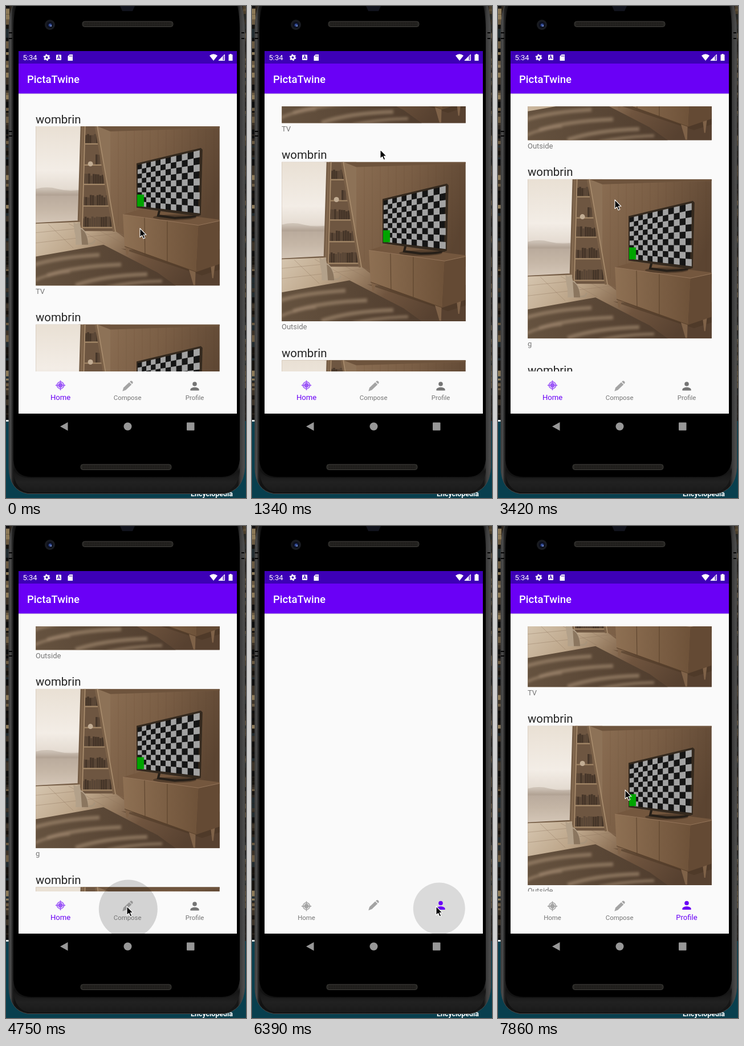
An HTML page for the animation above (8000 ms loop, 421 by 863 pixels).

```html
<!DOCTYPE html>
<html lang="en">
<head>
<meta charset="utf-8">
<title>Photo feed</title>
<style>
html, body { margin: 0; width: 100%; height: 100%; overflow: hidden; background: #111; }
svg { display: block; }
text { font-family: Roboto, "Open Sans", sans-serif; }
.title { font-size: 20.4px; fill: #222; }
.caption { font-size: 13px; fill: #777; }
.tab { color: #757575; }
.tab text { font-size: 11.4px; fill: currentColor; text-anchor: middle; }
.tab.on { color: #6a00f6; }
.tab.on text { font-size: 13.1px; }
.soft { opacity: .64; }
</style>
</head>
<body>
<svg id="stage" width="421" height="863" viewBox="0 0 421 863">
  <defs>
    <linearGradient id="side" x1="0" x2="1" y1="0" y2="0">
      <stop offset="0" stop-color="#3a3a3a"/><stop offset=".008" stop-color="#4e4e4e"/>
      <stop offset=".014" stop-color="#262626"/><stop offset=".024" stop-color="#121212"/>
      <stop offset=".97" stop-color="#161616"/><stop offset=".982" stop-color="#3c3c3c"/>
      <stop offset="1" stop-color="#505050"/>
    </linearGradient>
    <linearGradient id="chin" x1="0" x2="0" y1="0" y2="1">
      <stop offset="0" stop-color="#121212"/><stop offset=".6" stop-color="#212121"/><stop offset="1" stop-color="#1a1a1a"/>
    </linearGradient>
    <linearGradient id="sky" x1="0" x2="0" y1="0" y2="1">
      <stop offset="0" stop-color="#e9e0d4"/><stop offset=".45" stop-color="#f3ede6"/>
      <stop offset=".64" stop-color="#e4dbd1"/><stop offset=".7" stop-color="#b9aa9c"/>
      <stop offset=".84" stop-color="#c5b6a6"/><stop offset="1" stop-color="#d5c7b8"/>
    </linearGradient>
    <linearGradient id="wall" x1="0" x2="1" y1="0" y2=".35">
      <stop offset="0" stop-color="#9a8066"/><stop offset=".35" stop-color="#8a6d52"/>
      <stop offset=".65" stop-color="#7a5e45"/><stop offset="1" stop-color="#5b4431"/>
    </linearGradient>
    <linearGradient id="floor" x1="0" x2="1" y1="0" y2=".3">
      <stop offset="0" stop-color="#d6c6b0"/><stop offset=".3" stop-color="#bda68a"/>
      <stop offset=".5" stop-color="#957a5f"/><stop offset=".68" stop-color="#6f543e"/>
      <stop offset="1" stop-color="#574130"/>
    </linearGradient>
    <linearGradient id="wood" x1="0" x2="1" y1="0" y2="0">
      <stop offset="0" stop-color="#8e7053"/><stop offset="1" stop-color="#6e5239"/>
    </linearGradient>
    <linearGradient id="rug" x1="0" x2="1" y1="0" y2="0">
      <stop offset="0" stop-color="#65523f"/><stop offset="1" stop-color="#4f3c2d"/>
    </linearGradient>
    <filter id="blur" x="-10%" y="-30%" width="120%" height="160%"><feGaussianBlur stdDeviation="2.2"/></filter>
    <clipPath id="feedClip"><rect x="22" y="176" width="383" height="465"/></clipPath>
    <clipPath id="screenClip"><rect x="22" y="79" width="383" height="636"/></clipPath>
    <clipPath id="rugClip"><path d="M0 229L119 208L214 257L246 280H0Z"/></clipPath>

    <symbol id="photo" width="323" height="280" viewBox="0 0 323 280">
      <rect width="323" height="280" fill="url(#wall)"/>
      <path d="M75 0H131V182L76 170Z" fill="#8d7257"/>
      <path d="M108 0H323V3L131 9Z" fill="#6e543d"/>
      <path id="planks" stroke="#5f4731" stroke-opacity=".18" fill="none"/>
      <path d="M0 0H80L75 168L0 172Z" fill="url(#sky)"/>
      <path d="M0 110Q20 105 38 110T77 112V122H0Z" fill="#a99a8b" opacity=".4"/>
      <path d="M80 0L75 167L0 171" fill="none" stroke="#745c45" stroke-width="3"/>
      <path d="M0 171L77 168L140 184L156 196L323 216V280H0Z" fill="url(#floor)"/>
      <path d="M0 187L90 178M0 205L145 188M22 172L66 214M58 171L122 207M100 177L190 226M130 181L205 213" stroke="#8d755d" stroke-opacity=".4" fill="none"/>
      <path d="M0 229L119 208L214 257L246 280H0Z" fill="url(#rug)"/>
      <g clip-path="url(#rugClip)"><g filter="url(#blur)" fill="none" stroke="#9c846b" stroke-opacity=".7">
        <path d="M-5 244Q40 230 112 226M20 262Q70 246 150 243M70 279Q120 262 196 260" stroke-width="7"/>
        <path d="M-5 272Q25 258 60 255M125 283Q170 273 222 272" stroke-width="5"/>
      </g></g>
      <path d="M84 0H107L138 184H79Z" fill="#6e5641"/>
      <g id="books"></g>
      <path d="M85 0L80 186M106 0L138 185" stroke="#7b6148" stroke-width="5" fill="none"/>
      <path d="M86.5 0L81.5 186M108 0L140 185" stroke="#a78b6c" stroke-width="1.8" fill="none"/>
      <circle cx="96" cy="66" r="4.5" fill="#c2ad94"/>
      <path d="M92 206Q101 208 104 200" fill="none" stroke="#a8947b" stroke-width="3"/>
      <path d="M67 177L66 168L71 171L77 168L79 178Q92 184 92 208H70Q71 195 68 185Z" fill="#b3a18a"/>
      <path d="M79 180Q91 186 92 208H81Z" fill="#8b765f"/>
      <path d="M150 215L292 262L323 252V232Z" fill="#493423" opacity=".5"/>
      <path d="M157 208H167L162 226H159ZM268 248H281L280 279H277ZM307 242H315L312 267H310Z" fill="#7f6248"/>
      <path d="M153 155L183 146L323 164V184Z" fill="#74573e"/>
      <path d="M153 155L286 174L282 256L156 211Z" fill="url(#wood)"/>
      <path d="M286 174L323 166V242L282 256Z" fill="#644a34"/>
      <path d="M153 155L286 174L323 166" stroke="#94755a" fill="none"/>
      <path d="M191 161L192 224M231 167L231 238M156 211L282 256" stroke="#59412c" fill="none"/>
      <ellipse cx="244" cy="160" rx="38" ry="5" fill="#3f2e20" opacity=".6"/>
      <path d="M210 144L218 145L215 157L244 161Q279 160 281 157L275 150" fill="none" stroke="#261f18" stroke-width="4"/>
      <path d="M177 65L290 38L293 41L290 156L285 158L177 143Z" fill="#34291e"/>
      <path d="M179 68L288 42L285 153L179 140Z" fill="#151515"/>
      <path id="checks" fill="#a2a2a2"/>
      <rect x="178" y="120" width="12" height="21" fill="#00a400"/>
    </symbol>
  </defs>

  <rect width="421" height="863" fill="#2b241c"/>
  <g id="rocks"></g>
  <rect y="728" width="421" height="135" fill="#083f4e"/>
  <rect y="726" width="6" height="3" fill="#dfe6e6"/>
  <text x="324" y="860" style="font:700 12.4px Roboto,sans-serif" fill="#fff">Encyclopedia</text>

  <path d="M16 -10Q5 8 5 45V810Q6 850 38 855.5H383Q416 850 419 810V45Q418 8 410 -10Z" fill="url(#side)" stroke="#474747"/>
  <path d="M13 810Q17 828 45 828H376Q406 827 410 810V818Q406 848 381 853H40Q16 848 13 818Z" fill="url(#chin)"/>
  <path d="M20 -5Q13 10 13 45V796Q15 826 45 826H378Q407 826 410 796V45Q410 10 404 -5Z" fill="#000"/>
  <path d="M5 47H11M5 57H11M5 220H11M5 228H11M413 47H418M413 57H418" stroke="#050505" stroke-width="2"/>
  <path d="M200 0H226L222 9H204Z" fill="#11131c"/>
  <circle cx="77" cy="33" r="9" fill="#191b20"/>
  <circle cx="77" cy="33" r="5.5" fill="#0c1020"/>
  <circle cx="77.5" cy="33.5" r="2.8" fill="#324a91"/>
  <circle cx="79" cy="35" r="1" fill="#a6bcf0"/>
  <g id="speakers"></g>

  <rect x="22" y="79" width="383" height="636" fill="#fafafa"/>
  <rect x="22" y="153" width="383" height="1.5" fill="#d5d2da"/>
  <rect x="22" y="101" width="383" height="52.5" fill="#6a00f6"/>
  <rect x="22" y="79" width="383" height="22" fill="#3d00b6"/>
  <text x="37" y="134.5" font-size="18.5" font-weight="500" fill="#fff">PictaTwine</text>
  <text x="29.5" y="95" font-size="13" fill="#fff">5:34</text>
  <g fill="#fff">
    <circle cx="71.5" cy="90.3" r="3.2" fill="none" stroke="#fff" stroke-width="2.5"/>
    <circle cx="71.5" cy="90.3" r="5" fill="none" stroke="#fff" stroke-width="1.8" stroke-dasharray="2.6 2.636"/>
    <rect x="88" y="85.5" width="9" height="9.5" rx="1"/>
    <path d="M90 93L92.5 87L95 93M91 91.3H94" fill="none" stroke="#3d00b6" stroke-width="1.1"/>
    <path d="M111.5 85H117V96H108.5V88Z"/>
    <path d="M111.5 86.5V89M113.5 86.5V89M115.4 86.5V89" stroke="#3d00b6" stroke-width=".8"/>
    <path d="M357 87Q364 81.5 371 87L364 96Z"/>
    <path d="M373 95.5L383.5 85V95.5Z" opacity=".45"/>
    <path d="M373 95.5L380 88.5V95.5Z"/>
    <path d="M383.5 85V95.5H373Z" fill="none" stroke="#fff"/>
    <path d="M392.5 84H395.5V85.3H397.5V96H390.5V85.3H392.5Z"/>
  </g>

  <g clip-path="url(#feedClip)"><g id="feed"></g></g>
  <g clip-path="url(#screenClip)"><circle id="ripple" fill="#000"/></g>

  <g class="tab">
    <g class="icon soft" stroke="currentColor" fill="none">
      <circle r="6" stroke-width="1.6"/><circle r="4" fill="currentColor" stroke="none"/>
      <path d="M0 -8.6V8.6M-8.6 0H8.6" stroke-width="1.7"/>
    </g>
    <text x="95.5">Home</text>
  </g>
  <g class="tab">
    <g class="icon soft" fill="currentColor">
      <path d="M-9 9L-7.2 2.7L2.8 -6.8L7 -2.8L-3 6.8Z"/><path d="M3.8 -7.7L5.2 -9Q7 -9.8 8.7 -8Q10 -6.2 9 -5L7.9 -3.8Z"/>
    </g>
    <text x="213.2">Compose</text>
  </g>
  <g class="tab">
    <g class="icon" fill="currentColor">
      <circle cy="-3.8" r="3.8"/><path d="M-7.6 7.6V5.7C-7.6 3.2 -2.5 1.9 0 1.9S7.6 3.2 7.6 5.7V7.6Z"/>
    </g>
    <text x="331">Profile</text>
  </g>

  <g fill="#979797">
    <path d="M95 737.5L108.5 730V745Z"/><circle cx="213.5" cy="737.5" r="7"/><rect x="317" y="730.5" width="13.5" height="14" rx="1"/>
  </g>
  <path id="cursor" d="M0 0V15.5L3.6 12.3L6 18L8.7 16.9L6.3 11.3H11Z" fill="#000" stroke="#fff" stroke-width="1.1" stroke-linejoin="round"/>
</svg>

<script>
const $ = id => document.getElementById(id);
const LOOP = 8000, STEPS = 54, PITCH = 347.6;

let seed = 7;
const rand = () => (seed = (seed * 16807) % 2147483647) / 2147483647;

function buildRocks() {
  const tones = ['#14110d', '#6b5a41', '#3b3227', '#8d7a58', '#202a2e', '#0c0c0c'];
  let out = '';
  for (let y = 0; y < 728; y += 3 + rand() * 9) {
    const tone = () => tones[Math.floor(rand() * tones.length)];
    out += `<rect y="${y}" width="6" height="${3 + rand() * 9}" fill="${tone()}"/>`
         + `<rect x="416" y="${y}" width="5" height="9" fill="${tone()}" opacity=".5"/>`;
  }
  $('rocks').innerHTML = out;
}

function buildPhoto() {
  let planks = '';
  for (let x = 145; x < 323; x += 14) planks += `M${x} ${9 - (x - 131) * .03}V${175 + (x - 145) * .15}`;
  $('planks').setAttribute('d', planks);

  let books = '';
  [31, 68, 102, 140, 178].forEach((y, row) => {
    const left = 87 - y * .03, right = 104 + y * .17;
    for (let x = left; x < right - 3; x += 4) {
      if (row === 1 && x < 104) continue;
      const h = 15 + rand() * 5;
      books += `<rect x="${x}" y="${y - h}" width="3.6" height="${h}" fill="${rand() < .6 ? '#463629' : '#594636'}"/>`;
    }
    books += `<path d="M${left - 2} ${y}H${right + 2}" stroke="#a48868" stroke-width="2.2"/>`;
  });
  $('books').innerHTML = books;

  const cols = 12, rows = 9;
  const at = (i, j) => {
    const t = i / cols, u = t * (.8 + .2 * t), top = 68 - 26 * u, bottom = 140 + 13 * u;
    return `${179 + 109 * u} ${top + (bottom - top) * j / rows}`;
  };
  let checks = '';
  for (let i = 0; i < cols; i++)
    for (let j = (i + 1) % 2; j < rows; j += 2)
      checks += `M${at(i, j)}L${at(i + 1, j)}L${at(i + 1, j + 1)}L${at(i, j + 1)}Z`;
  $('checks').setAttribute('d', checks);
}

function buildFeed() {
  $('feed').innerHTML = ['TV', 'Outside', 'g', 'TV'].map((caption, i) =>
    `<g transform="translate(52 ${211 + i * PITCH})">
      <text class="title" y="-5.5">wombrin</text>
      <use href="#photo" width="323" height="279.5"/>
      <text class="caption" y="293.7">${caption}</text>
    </g>`).join('');
}

function buildSpeakers() {
  $('speakers').innerHTML = [[134, 27], [131, 804]].map(([x, y]) =>
    `<rect x="${x}" y="${y}" width="159" height="9.5" rx="4" fill="#262522" stroke="#3a3936"/>
     <path d="M${x + 4} ${y + 3}h151m-151 3.5h151" stroke="#100f0e" stroke-width="1.5" stroke-dasharray="1.5 1.5"/>`).join('');
}

// Keys: step, then values
const cursorKeys = [
  [0, 235, 390], [4, 231, 251], [6, 230, 397], [9, 225, 252], [12, 220, 390], [16, 212, 220],
  [19, 212, 487], [23, 205, 340], [24, 203, 333], [26, 200, 430], [29, 210, 687], [30, 212, 667],
  [35, 212, 667], [40, 323, 667], [44, 323, 667], [47, 228, 605], [48, 228, 605], [53, 223, 463]
];
const scrollKeys = [
  [0, 0], [4, 140], [6, 146], [9, 285], [12, 290], [16, 455.5], [19, 460],
  [23, 602.5], [24, 620.5], [33, 620.5], [34, 0], [48, 0], [53, 208]
];
// step: x, y, radius, alpha
const ripples = {
  32: [214.3, 672, 51.5, .155], 33: [214, 674, 56, .07],
  43: [328.3, 671, 45.5, .125], 44: [330, 673, 56, .07]
};

function sample(keys, k) {
  const n = keys.findIndex(key => key[0] >= k);
  if (n <= 0) return keys[n < 0 ? keys.length - 1 : 0].slice(1);
  const a = keys[n - 1], b = keys[n], p = (k - a[0]) / (b[0] - a[0]);
  return a.slice(1).map((v, i) => v + (b[i + 1] - v) * p);
}

const tabs = [...document.querySelectorAll('.tab')];
const tabX = [95.5, 213.3, 331];

function draw(k) {
  const page = k < 33 ? 0 : k < 43 ? 1 : 2;
  const [x, y] = sample(cursorKeys, k);
  $('cursor').setAttribute('transform', `translate(${x} ${y})`);
  $('feed').setAttribute('transform', `translate(0 ${-sample(scrollKeys, k)[0]})`);
  $('feed').setAttribute('opacity', k < 33 || k >= 45 ? 1 : k === 33 ? .4 : 0);

  const [cx, cy, r, alpha] = ripples[k] || [0, 0, 0, 0];
  Object.entries({ cx, cy, r, opacity: alpha }).forEach(([name, v]) => $('ripple').setAttribute(name, v));

  const switching = k === 33 || k === 43;
  tabs.forEach((tab, i) => {
    const on = i === page;
    const hidden = switching && (on || i === page - 1);
    tab.classList.toggle('on', on);
    tab.querySelector('.icon').setAttribute('transform', `translate(${tabX[i]} ${on || hidden ? 665.3 : 666.8})`);
    const label = tab.querySelector('text');
    label.setAttribute('y', on ? 691.2 : 691);
    label.setAttribute('opacity', hidden ? 0 : 1);
  });
}

buildRocks();
buildPhoto();
buildFeed();
buildSpeakers();

const start = performance.now();
let shown = -1;
function tick() {
  const k = Math.floor((performance.now() - start) % LOOP / LOOP * STEPS);
  if (k !== shown) draw(shown = k);
  requestAnimationFrame(tick);
}
tick();
</script>
</body>
</html>
```
